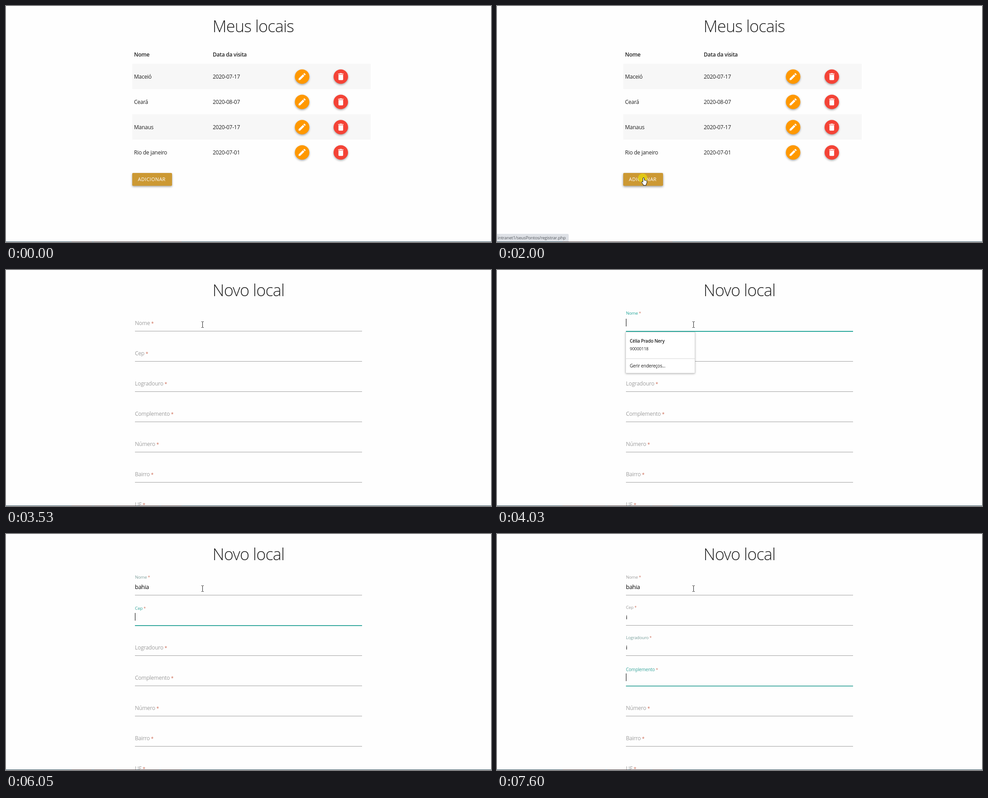
An HTML page with a canvas for the animation above (8 s loop, 1072 by 523 pixels).

```html
<!DOCTYPE html>
<html lang="pt">
<head>
<meta charset="utf-8">
<title>Locais</title>
<style>
  html, body { margin: 0; width: 100%; height: 100%; overflow: hidden; background: #fefefe; }
  canvas { display: block; }
</style>
</head>
<body>
<canvas id="stage" width="1072" height="523"></canvas>
<script>
const ctx = document.getElementById('stage').getContext('2d');
const LOOP = 8000;
const FAMILY = '"Open Sans", "Noto Sans", sans-serif';
const GREY = [158, 158, 158], TEAL = [38, 166, 154];
const INK = '#212121', STAR = '#cc6b55';

const PENCIL = new Path2D('M3 17.25V21h3.75L17.81 9.94l-3.75-3.75zM20.71 7.04c.39-.39.39-1.02 0-1.41l-2.34-2.34c-.39-.39-1.02-.39-1.41 0l-1.83 1.83 3.75 3.75z');
const BIN = new Path2D('M6 19c0 1.1.9 2 2 2h8c1.1 0 2-.9 2-2V7H6zM19 4h-3.5l-1-1h-5l-1 1H5v2h14z');
const ARROW = new Path2D('M.5.5V13.5L3.5 10.7 5.6 15.5 7.6 14.6 5.5 9.9H9.5Z');
const HAND = new Path2D('M3.5 10.5V2Q3.5.5 5 .5T6.5 2V6.2Q7.6 5.4 8.7 6.6 9.8 5.9 10.6 7.2 12.3 6.8 12.3 8.6V12L10.7 15V17.5H4.3V15.6L1 11.4Q-.2 9.4 1.3 9.1 2.4 9 3.5 10.5Z');

const places = [
  ['Maceió', '2020-07-17'],
  ['Ceará', '2020-08-07'],
  ['Manaus', '2020-07-17'],
  ['Rio de janeiro', '2020-07-01']
];
const fields = ['Nome', 'Cep', 'Logradouro', 'Complemento', 'Número', 'Bairro', 'UF'];

const mix = (a, b, k) => `rgb(${a.map((v, i) => Math.round(v + (b[i] - v) * k))})`;

function rect(x, y, w, h, color) {
  ctx.fillStyle = color;
  ctx.fillRect(x, y, w, h);
}

function disc(x, y, r, color) {
  ctx.fillStyle = color;
  ctx.beginPath();
  ctx.arc(x, y, r, 0, Math.PI * 2);
  ctx.fill();
}

function box(x, y, w, h, radius, color) {
  ctx.fillStyle = color;
  ctx.beginPath();
  ctx.roundRect(x, y, w, h, radius);
  ctx.fill();
}

// Draws a string and returns its advance width.
function text(str, x, y, size, color = INK, weight = 400, spacing = -0.022 * size) {
  ctx.font = `${weight} ${size}px ${FAMILY}`;
  ctx.letterSpacing = spacing + 'px';
  ctx.fillStyle = color;
  ctx.fillText(str, x, y);
  return ctx.measureText(str).width;
}

function withShadow(alpha, blur, dy, draw) {
  ctx.save();
  ctx.shadowColor = `rgba(0,0,0,${alpha})`;
  ctx.shadowBlur = blur;
  ctx.shadowOffsetY = dy;
  draw();
  ctx.restore();
}

function shape(path, x, y, scale, fill, stroke) {
  ctx.save();
  ctx.translate(x, y);
  ctx.scale(scale, scale);
  ctx.fillStyle = fill;
  ctx.fill(path);
  if (stroke) {
    ctx.lineWidth = 1;
    ctx.strokeStyle = stroke;
    ctx.stroke(path);
  }
  ctx.restore();
}

function roundButton(x, y, color, icon) {
  withShadow(0.35, 4, 2, () => disc(x, y, 16, color));
  shape(icon, x - 10.3, y - 10.3, 0.86, '#fff');
}

function title(str) {
  text(str, 456.5, 58, 36, INK, 300);
}

function listPage(hover) {
  title('Meus locais');
  text('Nome', 283, 112, 12, INK, 600);
  text('Data da visita', 457, 112, 12, INK, 600);
  places.forEach(([name, date], i) => {
    const y = 128 + i * 56;
    if (i % 2 === 0) rect(279, y, 527, 56, '#f7f7f7');
    text(name, 283, y + 33, 12);
    text(date, 457, y + 33, 12);
    roundButton(654.5, y + 28.5, '#ff9800', PENCIL);
    roundButton(740, y + 28.5, '#f44336', BIN);
  });
  withShadow(hover ? 0.42 : 0.35, hover ? 5 : 4, 2, () => box(279, 370, 88, 28.5, 2, '#cc9933'));
  text('ADICIONAR', 291.5, 388, 10.8, '#fff', 400, 0.4);
}

// lift: 0 = label resting in the field, 1 = label floated above it.
function field(name, i, { lift = 0, tint = 0, focus = 0, value = '', caret = false }) {
  const top = i * 67;
  const size = 12 * (1 - 0.2 * lift);
  const y = top + 122 - 23 * lift;
  const w = text(name + ' ', 285, y, size, mix(GREY, TEAL, tint));
  text('*', 285 + w, y, size * 0.85, STAR);
  rect(285, top + 135, 502, 1, mix(GREY, TEAL, focus));
  if (focus) {
    ctx.globalAlpha = focus;
    rect(285, top + 136, 502, 1, mix(GREY, TEAL, 1));
    ctx.globalAlpha = 1;
  }
  const end = value ? text(value, 285, top + 122, 12.5, '#000') : 0;
  if (caret) rect(285 + Math.round(end), top + 108, 1, 17, '#000');
}

function formPage(states) {
  title('Novo local');
  fields.forEach((name, i) => field(name, i, states[i] || {}));
}

function suggestions() {
  withShadow(0.3, 4, 1, () => box(284, 137, 153.5, 92, 2, '#fff'));
  ctx.strokeStyle = '#d4d4d4';
  ctx.lineWidth = 1;
  ctx.strokeRect(284.5, 137.5, 153, 91);
  rect(285, 135, 502, 2, mix(GREY, TEAL, 1));
  rect(285, 196, 152, 1, '#d8d8d8');
  text('Célia Prado Nery', 293.5, 161, 10, INK, 600);
  text('90000118', 293.5, 178, 9.4);
  text('Gerir endereços...', 293.5, 216, 10);
}

function statusBar(alpha) {
  ctx.globalAlpha = alpha;
  box(-2, 505, 160.5, 20, 3, '#dee1e6');
  text('intranet1/seusPontos/registrar.php', 1.5, 517, 9.6, '#55595e');
  ctx.globalAlpha = 1;
}

function taskbar() {
  rect(0, 522, 1072, 1, '#2c4a58');
  for (let x = 145; x < 390; x += 49.5) rect(x, 522, 45, 1, '#4a3d40');
}

function arrow(x, y) {
  shape(ARROW, x, y, 1, '#fff', '#000');
}

function hand() {
  shape(HAND, 319, 380, 1, '#fff', '#111');
}

function beam(x, y) {
  rect(x, y + 1, 1, 12, '#222');
  for (const dy of [0, 13]) {
    rect(x - 2, y + dy, 2, 1, '#222');
    rect(x + 1, y + dy, 2, 1, '#222');
  }
}

const active = (value = '', caret = true) => ({ lift: 1, tint: 1, focus: 1, value, caret });
const filled = (value, tint = 0) => ({ lift: 1, tint, value });
const entering = (lift, focus) => ({ lift, tint: 0.85, focus, caret: true });

function form(...states) {
  formPage(states);
  beam(434, 114);
}

// Each scene holds from its start time until the next one.
const scenes = [
  [0, () => listPage(false)],
  [500, () => { listPage(false); arrow(733, 421); }],
  [1000, () => { listPage(false); arrow(377, 450); }],
  [1500, () => { listPage(true); hand(); }],
  [2000, () => {
    listPage(true);
    disc(322, 381.5, 10.3, 'rgba(226,204,18,0.9)');
    hand();
    statusBar(1);
  }],
  [2550, () => { formPage([]); hand(); statusBar(0.5); }],
  [3050, () => { formPage([]); beam(433, 113); }],
  [3530, () => form()],
  [4030, () => { form(active()); suggestions(); }],
  [4580, () => form(active('bah'))],
  [5050, () => form(active('bahia'))],
  [5550, () => form(active('bahia', false))],
  [6050, () => form(filled('bahia', 0.25), entering(0.92, 0.9))],
  [6600, () => form(filled('bahia'), active('i'))],
  [7080, () => form(filled('bahia'), filled('i'), active())],
  [7600, () => form(filled('bahia'), filled('i'), filled('i', 0.3), entering(0.84, 0.75))]
];

const start = performance.now();

function frame() {
  const t = (performance.now() - start) % LOOP;
  rect(0, 0, 1072, 523, '#fefefe');
  scenes.findLast(([from]) => from <= t)[1]();
  taskbar();
  requestAnimationFrame(frame);
}
frame();
</script>
</body>
</html>
```
